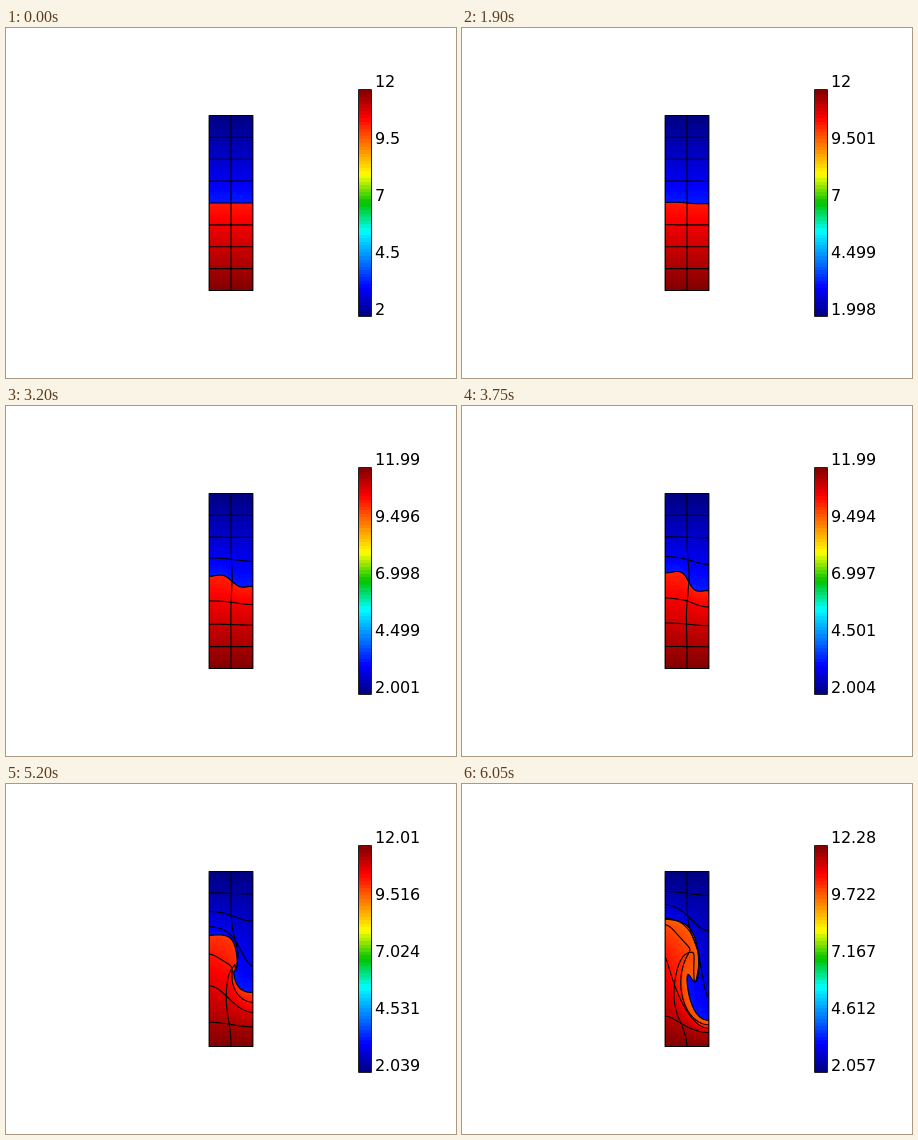
An HTML page with a canvas for the animation above (7100 ms loop, 450x350 px).

```html
<!DOCTYPE html>
<html lang="en">
<head>
<meta charset="utf-8">
<title>Two-layer mixing</title>
<style>
html, body { margin: 0; width: 100%; height: 100%; overflow: hidden; background: #fff; }
canvas { display: block; width: 450px; height: 350px; }
</style>
</head>
<body>
<canvas id="stage" width="450" height="350"></canvas>
<script>
const ctx = document.getElementById('stage').getContext('2d');
const LOOP = 7100, HOLD = 1100, STEP = 50, LAST = 100;
// The block is 1 wide and 4 high, with the layers meeting at y = 0.
const UNIT = 43.75, CX = 225, CY = 175;
const ROWS = 8, BANDS = 6, SAMPLES = 80;
const PI = Math.PI;

// Step, lowest value, highest value
const RANGE = [
  [0, 2, 12], [17, 1.998, 12.002], [31, 1.997, 11.9995], [54, 2.004, 11.9905],
  [68, 2.017, 11.9755], [83, 2.039, 12.0085], [100, 2.057, 12.277]
];
const STOPS = [
  [0, 0, 0, 128], [0.125, 0, 0, 255], [0.375, 0, 255, 255], [0.5, 0, 195, 0],
  [0.625, 255, 255, 0], [0.875, 255, 0, 0], [1, 128, 0, 0]
];

const mix = (a, b, u) => a + (b - a) * u;
const hump = (y, centre, width) => Math.exp(-(((y - centre) / width) ** 2));

// Linear lookup in a table keyed by its first column.
function lookup(table, key) {
  let i = 1;
  while (i < table.length - 1 && key > table[i][0]) i++;
  const a = table[i - 1], b = table[i];
  const u = Math.min(1, Math.max(0, (key - a[0]) / (b[0] - a[0])));
  return a.slice(1).map((v, c) => mix(v, b[c + 1], u));
}
const colour = f => `rgb(${lookup(STOPS, f).map(Math.round)})`;

// Wave amplitudes of the material row that starts at height y.
// sx: sideways sine terms 1 to 3; cy: vertical cosine terms 0 to 6.
// q is the growth of the main wave; rows far from the interface respond later.
function waves(y, q) {
  const g = (1 - (y / 2) ** 8) * q ** (1 + 1.4 * Math.abs(y));
  const h = Math.min(g, q * q);
  const core = hump(y, 0, 0.2);
  const curl = hump(y, -0.2, 0.4);
  return {
    sx: [
      g * (0.28 * hump(y, 0.3, 0.4) - 0.3 * hump(y, -1.1, 0.5)),
      g * 0.41 * hump(y, -0.2, 0.45),
      g * -0.16 * hump(y, -0.35, 0.25)
    ],
    cy: [
      h * (0.5 * hump(y, -0.7, 0.45) - 0.42 * hump(y, 0.3, 0.45)),
      g * 0.96 / (1 + ((y + 0.2) / 1.05) ** 6),
      h * (0.38 * core - 0.3 * hump(y, -0.2, 0.75)),
      (2 * h - g) * 0.32 * curl,
      h * -0.16 * core,
      g * -0.055 * core,
      h * 0.035 * core
    ]
  };
}

// Where the material point (m, y) is now, in pixels.
function place(m, y, { sx, cy }) {
  let px = m, py = y;
  sx.forEach((a, j) => px += a * Math.sin((j + 1) * PI * m));
  cy.forEach((a, j) => py += a * Math.cos(j * PI * m));
  return [CX + (px - 0.5) * UNIT, CY - py * UNIT];
}

const sample = f => Array.from({ length: SAMPLES + 1 }, (_, i) => f(i / SAMPLES));
function rowCurve(y, q) {
  const w = waves(y, q);
  return sample(m => place(m, y, w));
}
const columnCurve = q => sample(u => {
  // Samples crowd around the interface, where the line bends most.
  const y = 2 * (1 - 2 * u) * Math.abs(1 - 2 * u);
  return place(0.5, y, waves(y, q));
});

function trace(curve) {
  ctx.beginPath();
  curve.forEach(p => ctx.lineTo(...p));
}
function traceBelow(curve) {
  trace(curve);
  ctx.lineTo(CX + UNIT / 2, CY + 2 * UNIT);
  ctx.lineTo(CX - UNIT / 2, CY + 2 * UNIT);
  ctx.closePath();
}
function stroke(curve) {
  trace(curve);
  ctx.stroke();
}

function drawBlock(k, lo, hi) {
  const q = (k / LAST) ** 2.2;
  const box = [CX - UNIT / 2, CY - 2 * UNIT, UNIT, 4 * UNIT];
  const curves = Array.from({ length: ROWS + 1 }, (_, i) => rowCurve(2 - i / 2, q));
  ctx.save();
  ctx.beginPath();
  ctx.rect(...box);
  ctx.clip();
  for (let i = 0; i < ROWS; i++) {
    if (i === ROWS / 2) {
      traceBelow(curves[i]);
      ctx.clip();
    }
    for (let j = 0; j < BANDS; j++) {
      const u = j / BANDS, s = (i % 4 + u + 0.5 / BANDS) / 4;
      const band = curves[i].map((p, n) => p.map((v, c) => mix(v, curves[i + 1][n][c], u)));
      // Hot fluid cools as it rises.
      const rise = (CY - band[0][1]) / UNIT - (2 - (i + u) / 2);
      const e = i < 4 ? mix(lo, 3.5, s) : mix(10.5, hi, s) - 0.5 * rise;
      traceBelow(band);
      ctx.fillStyle = colour((e - lo) / (hi - lo));
      ctx.fill();
    }
  }
  ctx.restore();

  ctx.strokeStyle = '#000';
  ctx.lineJoin = 'round';
  ctx.lineWidth = 1.1;
  curves.slice(1, ROWS).forEach(stroke);
  stroke(columnCurve(q));
  ctx.strokeRect(...box);
}

function drawScale(lo, hi) {
  const x = 352, y = 62, w = 14, h = 226, n = 64;
  for (let i = 0; i < n; i++) {
    const top = Math.round(y + h * i / n);
    ctx.fillStyle = colour(1 - (i + 0.5) / n);
    ctx.fillRect(x, top, w, Math.round(y + h * (i + 1) / n) - top);
  }
  ctx.strokeStyle = '#222';
  ctx.lineWidth = 1;
  ctx.strokeRect(x + 0.5, y - 0.5, w - 1, h + 1);
  ctx.fillStyle = '#000';
  ctx.font = '16px "DejaVu Sans", sans-serif';
  ctx.letterSpacing = '-0.18px';
  for (let i = 0; i < 5; i++) {
    ctx.fillText(String(+mix(hi, lo, i / 4).toPrecision(4)), 369, 59 + 57 * i);
  }
}

let shown = -1;
function frame() {
  const t = performance.now() % LOOP;
  const k = t < HOLD ? 0 : Math.min(LAST, Math.floor((t - HOLD) / STEP) + 1);
  if (k !== shown) {
    shown = k;
    const [lo, hi] = lookup(RANGE, k);
    ctx.fillStyle = '#fff';
    ctx.fillRect(0, 0, 450, 350);
    drawBlock(k, lo, hi);
    drawScale(lo, hi);
  }
  requestAnimationFrame(frame);
}
frame();
</script>
</body>
</html>
```
